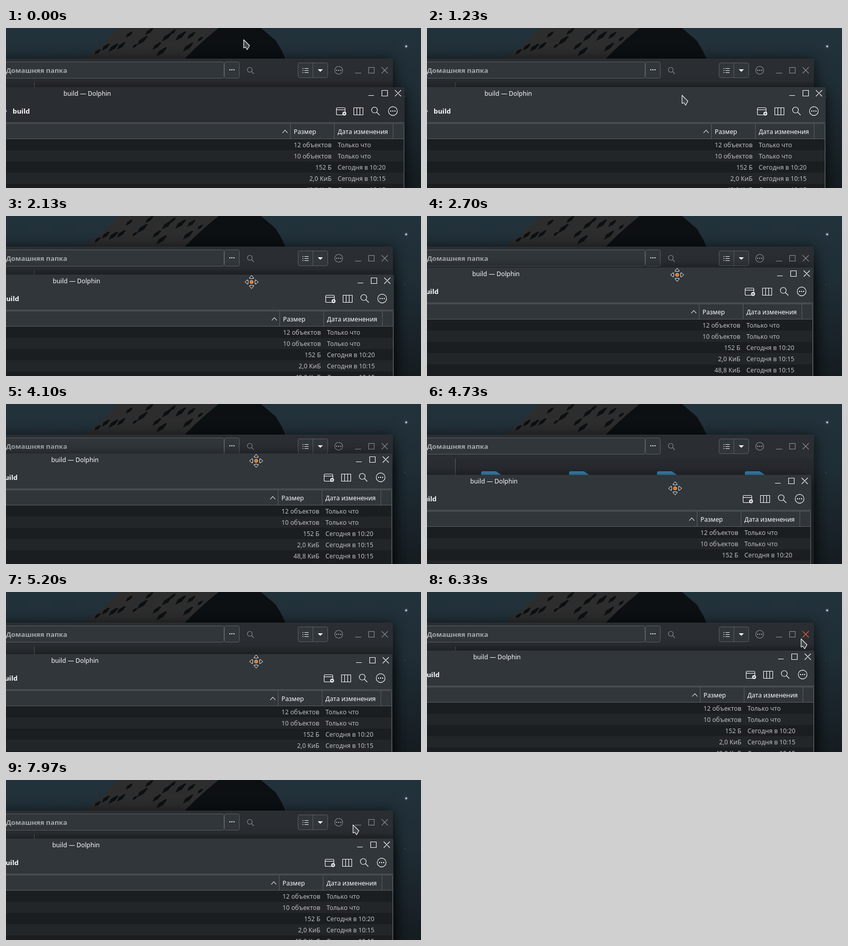
An HTML page for the animation above (8 s loop, 812 by 314 pixels).

```html
<!DOCTYPE html>
<html lang="ru">
<meta charset="utf-8">
<title>Dolphin</title>
<style>
  html, body { margin: 0; width: 100%; height: 100%; overflow: hidden; background: #1c2930; }
  svg { display: block; }
  text { font: 12.25px "Noto Sans", sans-serif; fill: #fcfcfc; white-space: pre; }
  .bold { font-size: 13.25px; font-weight: 700; }
  .end { text-anchor: end; }
  .cell { fill: #bcbebf; }
  .line { fill: none; stroke: #fcfcfc; stroke-width: 1.1; }
  .dim { stroke: #8b8f92; }
  .rule { fill: none; stroke: #5b5f63; }
</style>
<svg width="812" height="314" viewBox="0 0 812 314">
  <defs>
    <linearGradient id="sky" x2="0" y2="1">
      <stop stop-color="#22323b"/><stop offset=".4" stop-color="#1f2d35"/><stop offset="1" stop-color="#151c20"/>
    </linearGradient>
    <radialGradient id="glow">
      <stop stop-color="#cfe4f5" stop-opacity=".6"/><stop offset="1" stop-color="#7fa6c0" stop-opacity="0"/>
    </radialGradient>
    <filter id="blur" filterUnits="userSpaceOnUse" x="-100" y="0" width="1000" height="500">
      <feGaussianBlur stdDeviation="13"/>
    </filter>
    <path id="dots" d="M-5 -1h2v2h-2zM-1 -1h2v2h-2zM3 -1h2v2h-2z"/>
    <clipPath id="ridge"><path d="M221 0L186 34 150 62H547L541 47 528 25 499 0Z"/></clipPath>
  </defs>

  <rect width="812" height="314" fill="url(#sky)"/>
  <g clip-path="url(#ridge)">
    <rect x="150" width="400" height="62" fill="#2d2d2d"/>
    <path fill="#0c1012" d="M348 62L372 38 392 20 416 0H550V62Z"/>
    <path id="streaks" fill="#0c1012"/>
  </g>
  <circle cx="783" cy="36" r="4.5" fill="url(#glow)"/>
  <circle cx="783" cy="36" r="1.3" fill="#f4faff"/>
  <circle cx="780.5" cy="134.5" r=".7" fill="#6b7b84"/>

  <g id="back">
    <rect x="-60" y="63" width="817" height="330" opacity=".72" filter="url(#blur)"/>
    <path fill="#2a2e32" d="M0 60H754Q757 60 757 63V314H0Z"/>
    <path fill="#272a2e" d="M56 107H757V314H56Z"/>
    <path class="rule" d="M55.5 107V314"/>
    <g class="rule" style="fill:#31363b">
      <rect x="-10.5" y="66.5" width="437" height="32" rx="3"/>
      <rect x="427.5" y="66.5" width="29" height="32" rx="3"/>
      <rect x="571.5" y="68.5" width="58" height="29" rx="3"/>
      <path d="M600.5 68.5V97.5"/>
    </g>
    <text class="bold" y="88" style="fill:#a5a9ac">Домашняя папка</text>
    <use href="#dots" x="442" y="82" fill="#fcfcfc"/>
    <path class="line" stroke-dasharray="2 2 8 20" d="M580 79.5H592M580 83.5H592M580 87.5H592"/>
    <path fill="#fcfcfc" d="M610 81H620L615 86Z"/>
    <g class="line dim">
      <circle cx="477" cy="82" r="4.7"/><path d="M480.5 85.5L485 90"/>
      <circle cx="651" cy="83" r="7.7"/>
      <path d="M683 88.5H695"/>
      <rect id="maximize" x="709.5" y="77.5" width="11" height="11"/>
      <path id="close" d="M735 77L747 89M747 77L735 89"/>
    </g>
    <use href="#dots" x="651" y="83" fill="#a5a9ac"/>
    <g id="folders" fill="#3b87b5"></g>
  </g>

  <g id="front">
    <rect x="-60" y="121" width="840" height="330" opacity=".72" filter="url(#blur)"/>
    <path id="header" d="M-40 116H777Q780 116 780 119V400H-40Z"/>
    <text x="112.5" y="133">build — Dolphin</text>
    <text class="bold" x="13" y="168">build</text>
    <g class="line">
      <path d="M-3 159L1 163 -3 167"/>
      <path d="M709 132.5H720M735.5 122.5H746.5V133.5H735.5ZM761 122L773 134M773 122L761 134"/>
      <rect x="646.5" y="156.5" width="17" height="14" rx="2"/><path d="M646.5 160.5H663.5"/>
      <path d="M680.5 156.5H698.5V170.5H680.5ZM686.5 156.5V170.5M692.5 156.5V170.5"/>
      <circle cx="721" cy="161" r="5.7"/><path d="M725 165L731 171"/>
      <circle cx="757" cy="163" r="8.6"/>
    </g>
    <circle cx="662" cy="168" r="3.7" fill="#fcfcfc"/>
    <path stroke="#2a2e32" d="M660 168H664M662 166V170"/>
    <use href="#dots" x="757" y="163" fill="#fcfcfc"/>
    <rect x="-40" y="187" width="818" height="31" fill="#31363b"/>
    <rect x="-40" y="218" width="818" height="200" fill="#1b1e20"/>
    <g id="rows"></g>
    <path class="rule" d="M-40 185.5H780M-40 187.5H776Q778.5 187.5 778.5 190V400M-40 217.5H778M556.5 188V217M642.5 188V217M757.5 188V217"/>
    <path class="line" d="M541 206L546 200.5 551 206"/>
    <text x="563" y="208">Размер</text>
    <text x="649" y="208">Дата изменения</text>
  </g>

  <path id="arrow" fill="#41464a" stroke="#f4f4f4" stroke-width="1.2" stroke-linejoin="round" d="M1 1V17L4.500 15.500 8 20.500 12.500 12.500Z"/>
  <g id="mover" fill="#2a2e32" stroke="#fcfcfc" stroke-linejoin="round">
    <circle r="3.2" fill="#f67400" stroke="#e8d5c0" stroke-width=".7"/>
  </g>
</svg>
<script>
  const $ = id => document.getElementById(id);
  const LOOP = 8000, DRAG_START = 1830, DRAG_END = 5870, LAG = 40;
  const GRAB = [513, 130];

  const files = [
    ['12 объектов', 'Только что'], ['10 объектов', 'Только что'],
    ['152 Б', 'Сегодня в 10:20'], ['2,0 КиБ', 'Сегодня в 10:15'],
    ['48,8 КиБ', 'Сегодня в 10:15'],
  ];
  $('rows').innerHTML = files.map(([size, date], i) => {
    const y = 218 + 22 * i;
    return (i % 2 ? `<rect x="-40" y="${y}" width="818" height="22" fill="#232629"/>` : '') +
      `<text class="cell end" x="637" y="${y + 16}">${size}</text>` +
      `<text class="cell" x="649" y="${y + 16}">${date}</text>`;
  }).join('');

  for (let x = 106; x < 757; x += 172)
    $('folders').innerHTML += `<path d="M${x} 180v-45q0 -3 3 -3h24q3 0 5 2l7 5h21v41z"/>`;
  for (let angle = 0; angle < 360; angle += 90)
    $('mover').innerHTML += `<path transform="rotate(${angle})" d="M0 -13L4.500 -7.500Q0 -5.500 -4.500 -7.500Z"/>`;

  // Slivers of shadow running down the lit slope
  let seed = 7;
  const random = () => (seed = seed * 16807 % 2147483647) / 2147483647;
  let slivers = '';
  for (let i = 0; i < 16; i++) {
    const x = 175 + 13 * i + random() * 12, y = random() * 50, size = 5 + random() * 9;
    slivers += `M${x} ${y}l${size} -${size * .6} 3 1 -${size * .6} ${size * .8} -${size} ${size * .5}z`;
  }
  $('streaks').setAttribute('d', slivers);

  // Pointer moves: [start, duration, x, y]; it rests in between
  const moves = [
    [30, 100, 476, 27], [300, 730, 498, 131], [1400, 230, ...GRAB],
    [1830, 220, 504, 130], [2050, 80, 480, 129], [2130, 500, 489, 115], [2770, 460, 489, 111],
    [4100, 550, 485, 141], [4650, 80, 485, 165], [4970, 190, 489, 136], [5370, 60, 491, 129],
    [5870, 310, 768, 104], [6180, 150, 731, 91], [6330, 300, 735, 86],
    [6970, 130, 712, 86], [7100, 130, 735, 86], [7430, 540, 678, 87],
  ];

  function pointerAt(t) {
    let x = 464, y = 22;
    for (const [start, duration, toX, toY] of moves) {
      if (t < start) break;
      const k = Math.min(1, (t - start) / duration);
      x += (toX - x) * k;
      y += (toY - y) * k;
    }
    return [Math.round(x), Math.round(y)];
  }

  const clamp = (v, low, high) => Math.min(high, Math.max(low, v));
  const place = (id, x, y) => $(id).setAttribute('transform', `translate(${x} ${y})`);

  function draw(now) {
    const t = now % LOOP;
    const [x, y] = pointerAt(t);
    const dragging = t >= DRAG_START && t < DRAG_END;

    // The window trails the pointer slightly while it is held
    const [heldX, heldY] = pointerAt(clamp(t - LAG, DRAG_START, DRAG_END));
    place('front', heldX - GRAB[0], heldY - GRAB[1]);
    place('arrow', x, y);
    place('mover', x + .5, y + .5);
    $('arrow').style.display = dragging ? 'none' : '';
    $('mover').style.display = dragging ? '' : 'none';

    const over = (left, right) => !dragging && y > 70 && y < 96 && x >= left && x < right;
    $('close').style.stroke = over(728, 755) ? '#e8643c' : '';
    $('maximize').style.stroke = over(702, 728) ? '#fcfcfc' : '';

    const active = clamp((t - 880) / 150, 0, 1);
    $('header').style.fill = `rgb(${[42, 46, 50].map((c, i) => c + (7 + i) * active)})`;
    requestAnimationFrame(draw);
  }
  requestAnimationFrame(draw);
</script>
</html>
```
